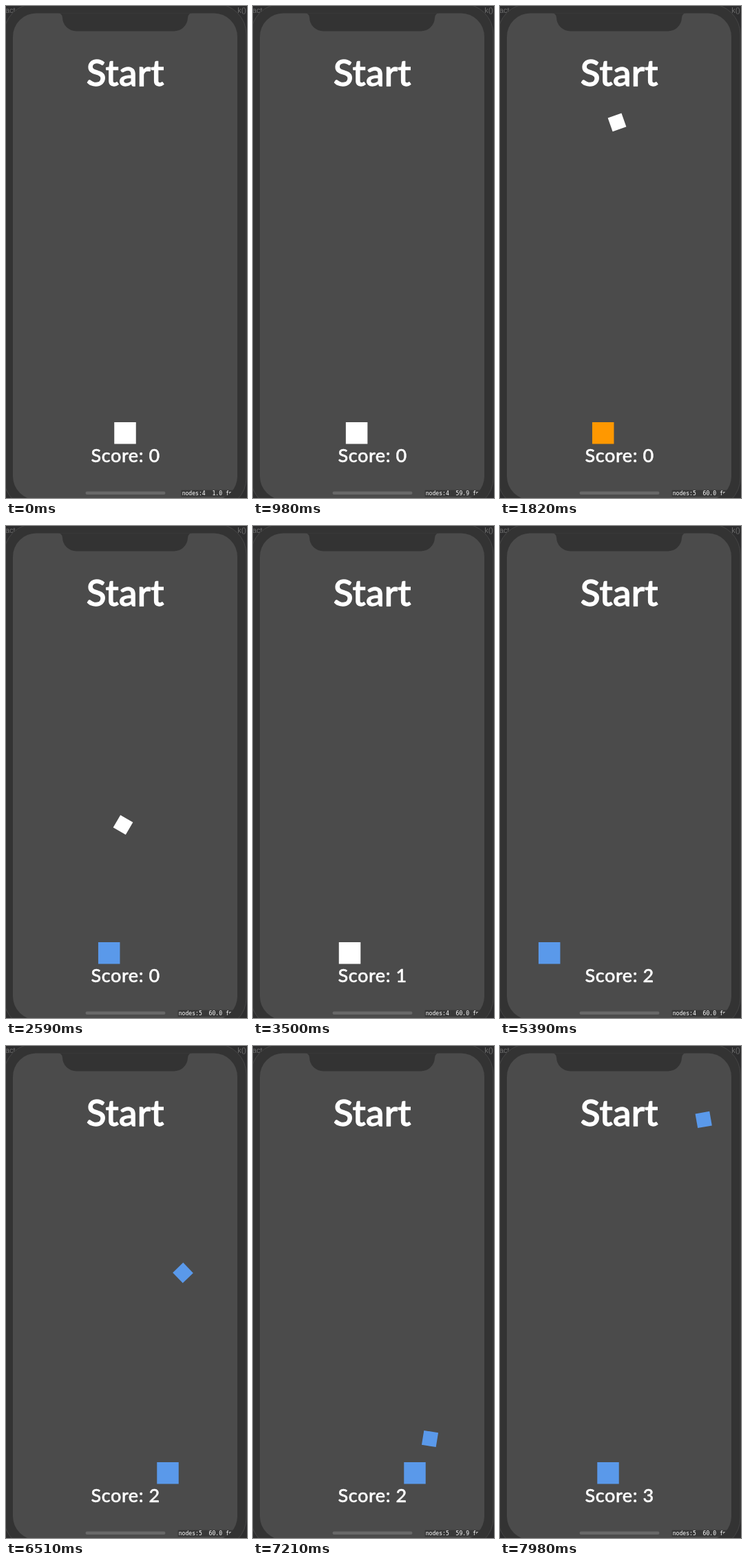
These frames come from a looping animation (350 px wide and 714 px high, 8 s). An HTML page:

```html
<!DOCTYPE html>
<html lang="en">
<head>
<meta charset="utf-8">
<title>Catch game</title>
<style>
  html, body { margin: 0; width: 100%; height: 100%; overflow: hidden; background: #2d2d2e; }
  svg { display: block; width: 350px; height: 714px; }
  .label { font-family: Lato, sans-serif; font-weight: 500; fill: #fff; stroke: #fff; text-anchor: middle; }
  .title { font-size: 53px; stroke-width: 1.3px; letter-spacing: 0.2px; }
  .score { font-size: 27px; stroke-width: 0.5px; letter-spacing: 0.55px; }
  .stats { font: 8.1px "DejaVu Sans Mono", monospace; fill: #fff; text-anchor: end; white-space: pre; }
  .code { font: 11px "Liberation Sans", sans-serif; fill: #6c6c6c; }
</style>
</head>
<body>
<svg viewBox="0 0 350 714">
  <defs>
    <clipPath id="screen"><rect x="10" y="10.5" width="326" height="706" rx="34"/></clipPath>
  </defs>
  <text class="code" x="-1" y="10">act</text>
  <text class="code" x="349" y="10" text-anchor="end">k()</text>
  <rect x="-3" y="-3" width="352" height="732" rx="44" fill="#333" stroke="#454545"/>
  <g clip-path="url(#screen)">
    <rect width="350" height="720" fill="#4b4b4b"/>
    <text class="label title" x="173.2" y="116">Start</text>
    <text class="label score" id="score" x="173.6" y="662"></text>
    <rect id="player" y="604" width="31.5" height="31.5"/>
    <rect id="drop" x="-10.5" y="-10.5" width="21" height="21"/>
    <rect x="115.500" y="704.500" width="116" height="4.400" rx="2.200" fill="#686868"/>
    <rect id="plate" y="702.500" width="90" height="9.500" fill="#383838"/>
    <text class="stats" id="stats" x="333.6" y="710"></text>
    <path d="M75 10A7 7 0 0 1 82 17A20 20 0 0 0 102 36.500H244A20 20 0 0 0 264 17A7 7 0 0 1 271 10Z" fill="#333"/>
  </g>
</svg>
<script>
const LOOP = 8000, STEP = 70;
const WHITE = '#fff', ORANGE = '#ff9800', BLUE = '#5a99ea';
const SPEED = 0.344, SPAWN_Y = 44, TURN = -0.153;

// [time, centre x]
const path = [
  [0, 173], [420, 173], [560, 167], [630, 167], [1120, 144], [1260, 144],
  [1470, 149.7], [3430, 149.7], [3990, 76], [5320, 76], [5390, 71.7],
  [5600, 78], [6160, 190], [6440, 235], [7280, 235], [7700, 157], [8000, 157]
];
// [time, value], held until the next entry
const colors = [[0, WHITE], [1610, ORANGE], [2240, BLUE], [2730, WHITE], [4410, ORANGE], [4690, BLUE]];
const scores = [[0, 0], [3080, 1], [5180, 2], [7280, 3]];
const rates = [[0, '1.0'], [490, '59.9'], [1400, '60.0'], [6930, '59.9'], [7910, '60.0']];
const drops = [
  { spawn: 1457, from: 1540, to: 3080, x: 170, color: WHITE },
  { spawn: 3569, from: 3570, to: 5180, x: 57.5, color: BLUE },
  { spawn: 5681, from: 5740, to: 7280, x: 257, color: BLUE },
  { spawn: 7797, from: 7840, to: 8000, x: 295.7, color: BLUE }
];

const el = id => document.getElementById(id);
const score = el('score'), player = el('player'), drop = el('drop');
const plate = el('plate'), stats = el('stats');

const held = (table, t) => table.filter(row => row[0] <= t).pop()[1];

function along(table, t) {
  const i = table.findIndex(row => row[0] > t);
  const [t0, a] = table[i - 1], [t1, b] = table[i];
  return a + (b - a) * (t - t0) / (t1 - t0);
}

function setText(node, text) {
  if (node.textContent !== text) node.textContent = text;
}

function draw(t) {
  player.setAttribute('x', along(path, t) - 15.75);
  player.setAttribute('fill', held(colors, t));
  setText(score, 'Score: ' + held(scores, t));

  const d = drops.find(d => t >= d.from && t < d.to);
  drop.style.display = d ? '' : 'none';
  if (d) {
    const y = SPAWN_Y + SPEED * (t - d.spawn);
    drop.setAttribute('transform', `translate(${d.x} ${y}) rotate(${TURN * (y - 42)})`);
    drop.setAttribute('fill', d.color);
  }

  const line = `nodes:${d ? 5 : 4}  ${held(rates, t)} fps`;
  setText(stats, line);
  plate.setAttribute('x', 332.6 - line.length * 4.876);
}

const start = performance.now();
function tick() {
  const t = (performance.now() - start) % LOOP;
  draw(Math.floor(t / STEP) * STEP);
  requestAnimationFrame(tick);
}
tick();
</script>
</body>
</html>
```
